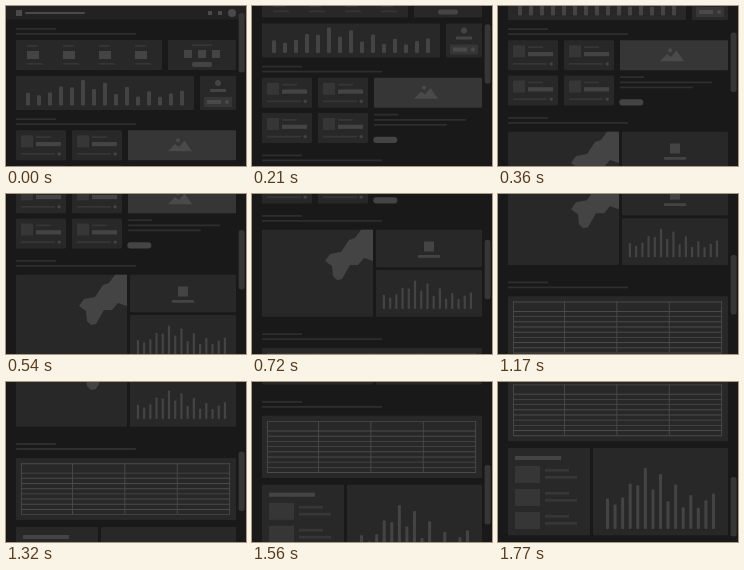
Animation, 240 px wide and 160 px high, one loop 2700 ms. Source, as an HTML page with a canvas:

```html
<!DOCTYPE html>
<html lang="en">
<head>
<meta charset="utf-8">
<title>Scrolling wireframe</title>
<style>
html, body { margin: 0; width: 100%; height: 100%; overflow: hidden; background: #191919; }
canvas { display: block; width: 100vw; height: 100vh; }
</style>
</head>
<body>
<canvas id="stage" width="240" height="160"></canvas>
<script>
const ctx = document.getElementById('stage').getContext('2d');
const LOOP = 2700, STEP = 30;
const BG = '#191919', HEADER = '#222222', CARD = '#282828', FAINT = '#2e2e2e';
const DIM = '#363636', MID = '#444444', LIGHT = '#4a4a4a';

function box(x, y, w, h, color, r = 0) {
  ctx.fillStyle = color;
  ctx.beginPath();
  ctx.roundRect(x, y, w, h, r);
  ctx.fill();
}

function dot(x, y, r, color) {
  ctx.fillStyle = color;
  ctx.beginPath();
  ctx.arc(x, y, r, 0, Math.PI * 2);
  ctx.fill();
}

function shape(path, color) {
  ctx.fillStyle = color;
  ctx.fill(new Path2D(path));
}

function repeat(count, item) {
  for (let i = 0; i < count; i++) item(i);
}

const card = (x, y, w, h, color = CARD) => box(x, y, w, h, color, 1);
const line = (x, y, w, color = DIM) => box(x, y, w, 1.8, color, 0.6);

function heading(y) {
  line(10, y, 40, FAINT);
  line(10, y + 5, 120, FAINT);
}

// A skewed wave with every other bar raised, strongest in the middle.
function level(i) {
  const phase = (i - 0.3) * 0.5325;
  const wave = 39 - 13.5 * Math.cos(phase + 0.4 * (1 - Math.cos(phase)));
  const swing = 11 * Math.sin(Math.PI * (i - 1.7) / 11.8);
  return (wave + (i % 2 ? swing : -swing)) / 60;
}

function chart(x, base, gap, width, height) {
  repeat(15, i => {
    const h = level(i) * height;
    box(x + i * gap, base - h, width, h, MID, width / 3);
  });
}

function header() {
  box(0, 0, 240, 13.5, HEADER);
  box(10, 4, 6, 6, LIGHT);
  box(19, 6, 60, 2, LIGHT, 1);
  repeat(2, i => box(202 + i * 10, 5, 4, 4, LIGHT));
  dot(226, 7, 4, LIGHT);
}

function overview() {
  heading(22);
  card(10, 34, 146, 30);
  repeat(4, i => {
    const x = 21 + i * 36;
    line(x, 39, 11);
    box(x, 45, 12, 8, MID);
    line(x, 57, 16);
  });
  card(162, 34, 68, 30);
  line(186, 38.2, 20);
  repeat(3, i => box(178 + i * 14, 44, 8, 8, MID));
  box(186, 56, 20, 5, MID, 2);

  card(10, 70, 178, 34);
  chart(20, 99.5, 11, 4, 25);
  card(194, 70, 36, 34);
  dot(212, 77, 3, MID);
  box(204, 83, 16, 3, MID, 0.5);
  box(198, 91, 28, 10, DIM, 1);
  box(201, 94, 14, 4, LIGHT);
  dot(221, 96, 2, LIGHT);
}

function tile(x, y) {
  card(x, y, 50, 30);
  box(x + 5, y + 5, 12, 12, DIM);
  line(x + 20, y + 6, 15);
  box(x + 20, y + 11.7, 25, 4.2, MID);
  line(x + 5, y + 22.7, 34);
  dot(x + 43.2, y + 23.6, 1.7, MID);
}

function gallery() {
  heading(112.3);
  repeat(4, i => tile(10 + i % 2 * 56, 124.3 + (i >> 1) * 35.2));
  card(122, 124.3, 108, 30, DIM);
  dot(172, 134.2, 2, LIGHT);
  shape('M162 145.3l7-7.3 4 3 5.5-6.5 7.5 10.8z', LIGHT);
  line(122, 160.2, 24, FAINT);
  line(122, 165.5, 92, FAINT);
  line(122, 170.5, 73, FAINT);
  box(121.3, 183.3, 24, 6.2, MID, 3);
}

function region() {
  heading(201);
  card(10, 215.8, 111, 87);
  shape('M121 215.8H109L103 224 97 226 89 238 78 240 73 247 80 252 81 262 85 266 90 265 98 251 106 251 112 244 121 247z', MID);
  card(124, 215.8, 106, 37.4);
  box(172, 227.5, 10, 10, MID);
  box(166, 241, 22, 2.8, MID, 0.5);
  card(124, 256, 106, 46.8);
  chart(130.8, 295, 6.22, 2.2, 28);
}

function table() {
  const left = 15, top = 339.4, width = 208.2, height = 50.9;
  const firstRow = 9.4, firstColumn = 51, rule = 0.9;
  const rowGap = (height - firstRow) / 8;
  const columnGap = (width - firstColumn) / 3;
  const across = y => box(left, y, width + rule, rule, LIGHT);
  const down = x => box(x, top, rule, height, LIGHT);
  heading(319.2);
  card(10, 334, 220, 62.2);
  across(top);
  down(left);
  repeat(9, i => across(top + firstRow + i * rowGap));
  repeat(4, i => down(left + firstColumn + i * columnGap));
}

function summary() {
  card(10, 403, 82, 87.2);
  box(17, 411, 46, 4, MID);
  repeat(3, i => {
    const y = 421 + i * 23;
    box(17, y, 25, 17, DIM);
    box(47, y + 3, 24, 2.8, DIM);
    box(47, y + 10, 32, 2.8, DIM);
  });
  card(95, 403, 135, 87.2);
  chart(108, 484, 7.57, 3, 60);
}

// Two linear scrolls separated by a pause.
function position(time) {
  const step = Math.floor(time / STEP);
  const first = Math.min(step, 26);
  const second = Math.min(Math.max(step - 32, 0), 27);
  return {
    scroll: first * 7.5 + second * 5.26,
    thumb: 7 + first * 1.615 + second * 1.7
  };
}

function draw(time) {
  const { scroll, thumb } = position(time);
  box(0, 0, 240, 160, BG);
  ctx.save();
  ctx.translate(0, -scroll);
  [header, overview, gallery, region, table, summary].forEach(section => section());
  ctx.restore();
  box(232.6, thumb, 6, 59.5, DIM, 2.5);
}

const start = performance.now();
function tick() {
  draw((performance.now() - start) % LOOP);
  requestAnimationFrame(tick);
}
tick();
</script>
</body>
</html>
```
